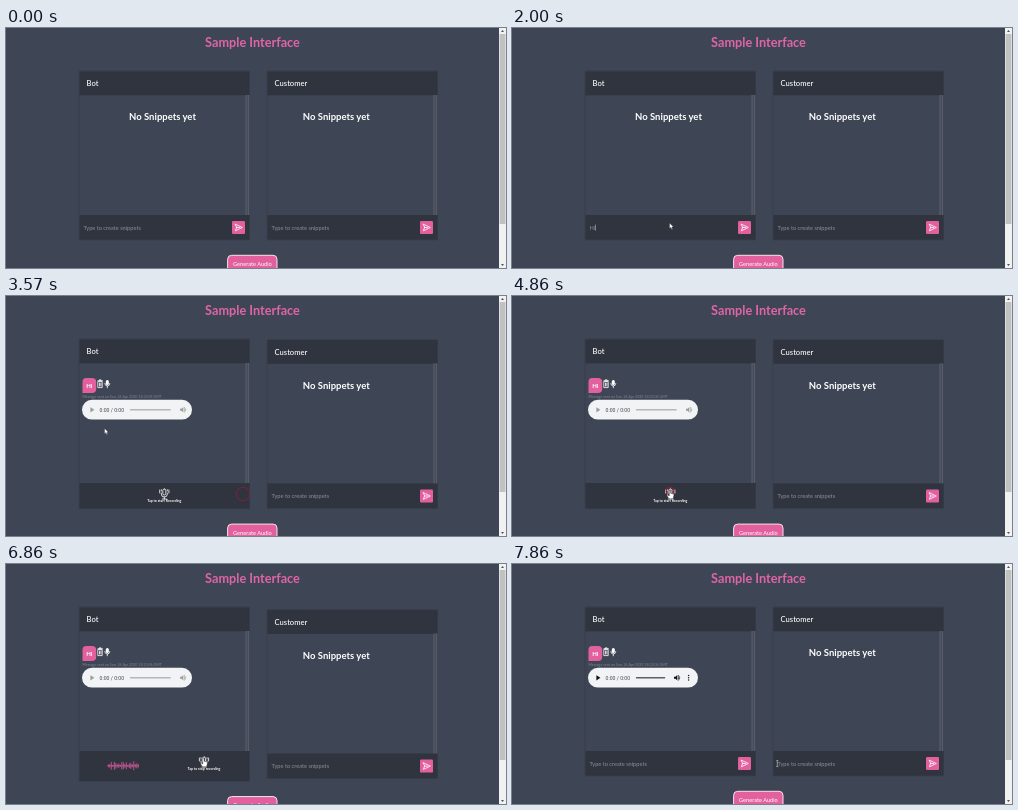
Animation, 500 px wide and 240 px high, one loop 8000 ms. Source, as an HTML page:

```html
<!DOCTYPE html>
<html lang="en">
<head>
<meta charset="utf-8">
<title>Sample Interface</title>
<style>
  html, body { margin: 0; width: 100%; height: 100%; overflow: hidden; background: #3e4555; }
  svg { display: block; width: 500px; height: 240px; }
  text { font-family: Lato, "Open Sans", sans-serif; fill: #fff; }
  .title { font-size: 12.7px; font-weight: 700; fill: #df65a7; }
  .head { font-size: 7.6px; font-weight: 500; }
  .empty { font-size: 9.5px; font-weight: 700; }
  .hint { font-size: 5.65px; fill: #8b8f98; }
  .tap { font-size: 3.5px; font-weight: 700; }
  .stamp { font-size: 3.6px; fill: #80858f; }
  .time { font: 5.15px Roboto, sans-serif; fill: #45484d; }
  .bar { fill: #2f343f; }
  .pink { fill: #e3609f; }
  .line { fill: none; stroke: #fff; stroke-width: .8; stroke-linecap: round; stroke-linejoin: round; }
</style>
</head>
<body>
<svg viewBox="0 0 500 240">
  <defs>
    <g id="send">
      <rect class="pink" x="226" y="193" width="13" height="13" rx="1.2"/>
      <path class="line" d="M229.4 196.2 236.3 199.5 229.4 202.8 230.5 199.5ZM230.5 199.5H233.5"/>
    </g>
    <g id="mic">
      <rect class="line" x="-1.5" y="-5" width="3" height="6" rx="1.5"/>
      <path class="line" d="M-3-1V0A3 3 0 0 0 3 0V-1M0 3V5M-2 5H2M-4.6-4V-1M4.6-4V-1M-3-4.3V-3M3-4.3V-3"/>
    </g>
    <g id="volume">
      <path d="M-3-1H-1.5L.3-2.8V2.8L-1.5 1H-3Z"/>
      <path d="M1.2-1.4Q2.2 0 1.2 1.4M1.3-2.8Q4.3 0 1.3 2.8" fill="none" stroke="currentColor" stroke-width=".7"/>
    </g>
  </defs>

  <rect width="500" height="240" fill="#3e4555"/>
  <text class="title" x="246.5" y="19.4" text-anchor="middle">Sample Interface</text>

  <g id="bot">
    <rect x="72.5" y="42.5" width="171.5" height="170" rx="1.5" fill="#393f4d" id="botEdge"/>
    <rect x="73.5" y="67" width="170" height="120" fill="#3e4555"/>
    <rect class="bar" x="73.5" y="43.5" width="170" height="23.8"/>
    <text class="head" x="80.6" y="58.2">Bot</text>
    <rect x="239.4" y="67" width="3.8" height="120" fill="#565c69"/>
    <rect x="240.6" y="67" width="1.4" height="120" fill="#464c5a"/>
    <rect class="bar" id="botFoot" x="73.5" y="187" width="170" height="24.6"/>
    <text class="empty" id="botEmpty" x="156.5" y="92.2" text-anchor="middle">No Snippets yet</text>

    <g id="message">
      <path class="pink" d="M80 82H86Q90.2 82 90.2 86V93Q90.2 97 86 97H76.5V86Q76.5 82 80 82Z"/>
      <text x="83.3" y="91.7" font-size="6" font-weight="700" text-anchor="middle">Hi</text>
      <path class="line" d="M92.2 85.5H96.2V91.6H92.2ZM92 84.7H96.4M93.4 84.5V83.8H95V84.5M93.5 87V90M94.9 87V90" stroke-width=".6"/>
      <rect x="99.8" y="84" width="3" height="5" rx="1.5" fill="#fff"/>
      <path class="line" d="M98.8 87.5Q99 90 101.3 90T103.8 87.5M101.3 90V91.8"/>
      <text class="stamp" x="76.5" y="102.4">Message sent on Sun, 26 Apr 2020 18:23:06 GMT</text>
      <rect x="76" y="103.8" width="110" height="19.8" rx="9.9" fill="#f1f3f4"/>
      <path id="play" d="M84.4 111.2V116.4L88.4 113.8Z"/>
      <text class="time" x="93.6" y="115.6">0:00 / 0:00</text>
      <rect id="track" x="123.8" y="113" width="41" height="1.4" rx=".7"/>
      <use id="vol" href="#volume" x="177" y="113.8"/>
      <g id="dots" fill="#222"><circle cx="176.6" cy="111.6" r=".75"/><circle cx="176.6" cy="113.8" r=".75"/><circle cx="176.6" cy="116" r=".75"/></g>
    </g>

    <g id="entry">
      <text class="hint" id="typed" x="77.4" y="201.5"></text>
      <rect id="caret" y="196.6" width=".6" height="6" fill="#b9bcc3"/>
      <use href="#send"/>
    </g>
    <g id="record">
      <use id="micIcon" href="#mic" y="198"/>
      <text class="tap" id="tap" y="205.6" text-anchor="middle"></text>
    </g>
    <path id="wave" fill="none" stroke="#b9548d" stroke-width="1"/>
  </g>

  <g id="customer">
    <rect x="260.5" y="42.5" width="171.5" height="170" rx="1.5" fill="#393f4d"/>
    <rect x="261.5" y="67" width="170" height="120" fill="#3e4555"/>
    <rect class="bar" x="261.5" y="43.5" width="170" height="23.8"/>
    <text class="head" x="268.6" y="58.2">Customer</text>
    <rect x="427.4" y="67" width="3.8" height="120" fill="#565c69"/>
    <rect x="428.6" y="67" width="1.4" height="120" fill="#464c5a"/>
    <rect class="bar" x="261.5" y="187" width="170" height="24.6"/>
    <text class="empty" x="330.3" y="92.2" text-anchor="middle">No Snippets yet</text>
    <text class="hint" x="265.6" y="201.5">Type to create snippets</text>
    <use href="#send" x="188"/>
  </g>

  <g id="generate">
    <rect class="pink" x="221.6" y="227.3" width="49.4" height="18" rx="4" stroke="#f3e3ec" stroke-width="1"/>
    <text x="246.4" y="238" font-size="5.65" text-anchor="middle">Generate Audio</text>
  </g>

  <rect x="493" width="7" height="240" fill="#f1f1f1"/>
  <rect x="493.6" y="6" width="5.8" height="190" fill="#c1c1c1"/>
  <path d="M495 4 496.5 2 498 4ZM495 236 496.5 238 498 236Z" fill="#505050"/>

  <circle id="ring" fill="none" stroke="#a3173c" stroke-width="1"/>
  <g id="pointer">
    <path id="arrow" d="M0 0V5.6L1.4 4.4 2.3 6.4 3.2 6 2.3 4.1H4Z" fill="#fff" stroke="#222" stroke-width=".35"/>
    <path id="hand" d="M-.7 .5Q0-.5 .7 .5V3.3L3.4 4Q4 4.3 3.9 5L3.2 8.7H-1L-3.2 5.6Q-2.6 4.6-.7 6Z" fill="#fff" stroke="#222" stroke-width=".4"/>
    <path id="beam" d="M-1-3H1M0-3V3M-1 3H1" fill="none" stroke="#d5d7dc" stroke-width=".6"/>
  </g>
</svg>
<script>
const LOOP = 8000, STEP = 1000 / 7;
const $ = id => document.getElementById(id);
const set = (id, attrs) => { for (const k in attrs) $(id).setAttribute(k, attrs[k]); };
const show = (id, on) => set(id, { visibility: on ? "visible" : "hidden" });
const move = (id, x, y) => set(id, { transform: `translate(${x} ${y})` });

// time, x, y of the pointer's tip
const path = [
  [280, 172, 243], [857, 157.5, 195], [2200, 157.5, 195], [2714, 237, 198],
  [3000, 237, 198], [3560, 98.5, 132.3], [3860, 98.5, 132.3], [4571, 158, 194],
  [5000, 158, 194], [5425, 188.5, 202], [5571, 192, 203], [5857, 197.5, 194],
  [7000, 197.5, 194], [7560, 265.3, 199.6]
];
const clicks = [[1000, 157.5, 195], [3000, 237, 198], [4780, 158, 195], [6950, 198, 195]];

// start, mode, customer shift, button shift, footer height
const stages = [
  [0, "entry", 0, 0, 24.6],
  [2990, "ready", .5, .8, 25.4],
  [4990, "recording", 2.6, 5.3, 29.8],
  [6990, "done", 0, 0, 24.6]
];

function pointerAt(t) {
  let i = path.findIndex(p => p[0] > t);
  if (i < 0) return path[path.length - 1].slice(1);
  if (!i) return path[0].slice(1);
  const [a, b] = [path[i - 1], path[i]];
  const u = (t - a[0]) / (b[0] - a[0]), k = u * u * (3 - 2 * u);
  return [a[1] + (b[1] - a[1]) * k, a[2] + (b[2] - a[2]) * k];
}

function wave(n) {
  let d = "";
  for (let i = 0; i < 21; i++) {
    const x = 102.3 + i * 1.5;
    const env = .35 + .65 * Math.abs(Math.sin(i * .47));
    const h = .5 + 4 * env * Math.abs(Math.sin(i * 1.9 + n * .8));
    d += `M${x} ${201.8 - h}V${201.8 + h}`;
  }
  return d + "M101.5 201.8H133";
}

function draw(ms) {
  const n = Math.floor((ms % LOOP + 10) / STEP), t = n * STEP;
  const [, mode, dy, drop, foot] = stages.filter(s => s[0] <= t).pop();
  const entry = mode === "entry" || mode === "done";
  const recording = mode === "recording", done = mode === "done";

  move("customer", 0, dy);
  move("generate", 0, drop);
  set("botFoot", { height: foot });
  set("botEdge", { height: foot + 145.4 });
  show("botEmpty", mode === "entry");
  show("message", mode !== "entry");
  show("entry", entry);
  show("record", !entry);

  const word = mode === "entry" ? "Hi".slice(0, (t > 1420) + (t > 1700)) : "";
  $("typed").textContent = word || "Type to create snippets";
  const focus = mode === "entry" && t > 1130;
  const caretOn = focus && (t > 1420 && t < 2420 || Math.floor(t / 500) % 2 === 0);
  show("caret", caretOn);
  set("caret", { x: 77.3 + [0, 4.3, 5.7][word.length] });

  const micX = recording ? 198 : 158.3;
  set("micIcon", { x: micX });
  set("tap", { x: micX });
  $("tap").textContent = recording ? "Tap to stop recording" : "Tap to start Recording";
  show("wave", recording);
  set("wave", { d: wave(n) });

  const ink = done ? "#111" : "#9b9da0";
  set("play", { fill: ink });
  set("vol", { x: done ? 165 : 177, fill: ink, color: ink });
  set("track", { width: done ? 29.5 : 41, fill: done ? "#5c5e61" : "#b4b6b9" });
  show("dots", done);

  const click = clicks.find(c => t >= c[0] - 1 && t < c[0] + 800);
  show("ring", !!click);
  if (click) {
    const u = (t - click[0]) / 800;
    set("ring", { cx: click[1], cy: click[2], r: 3.5 + 3.2 * Math.min(1, u * 1.4), opacity: 1 - .4 * u });
  }

  const [x, y] = pointerAt(t);
  const hand = t > 2700 && t < 3010 || t > 4500 && t < 5010 || t > 5780 && t < 7010;
  const beam = t > 7500;
  move("pointer", x, y);
  show("hand", hand);
  show("beam", beam);
  show("arrow", !hand && !beam && t > 280);
}

const start = performance.now();
function tick() {
  draw(performance.now() - start);
  requestAnimationFrame(tick);
}
tick();
</script>
</body>
</html>
```
